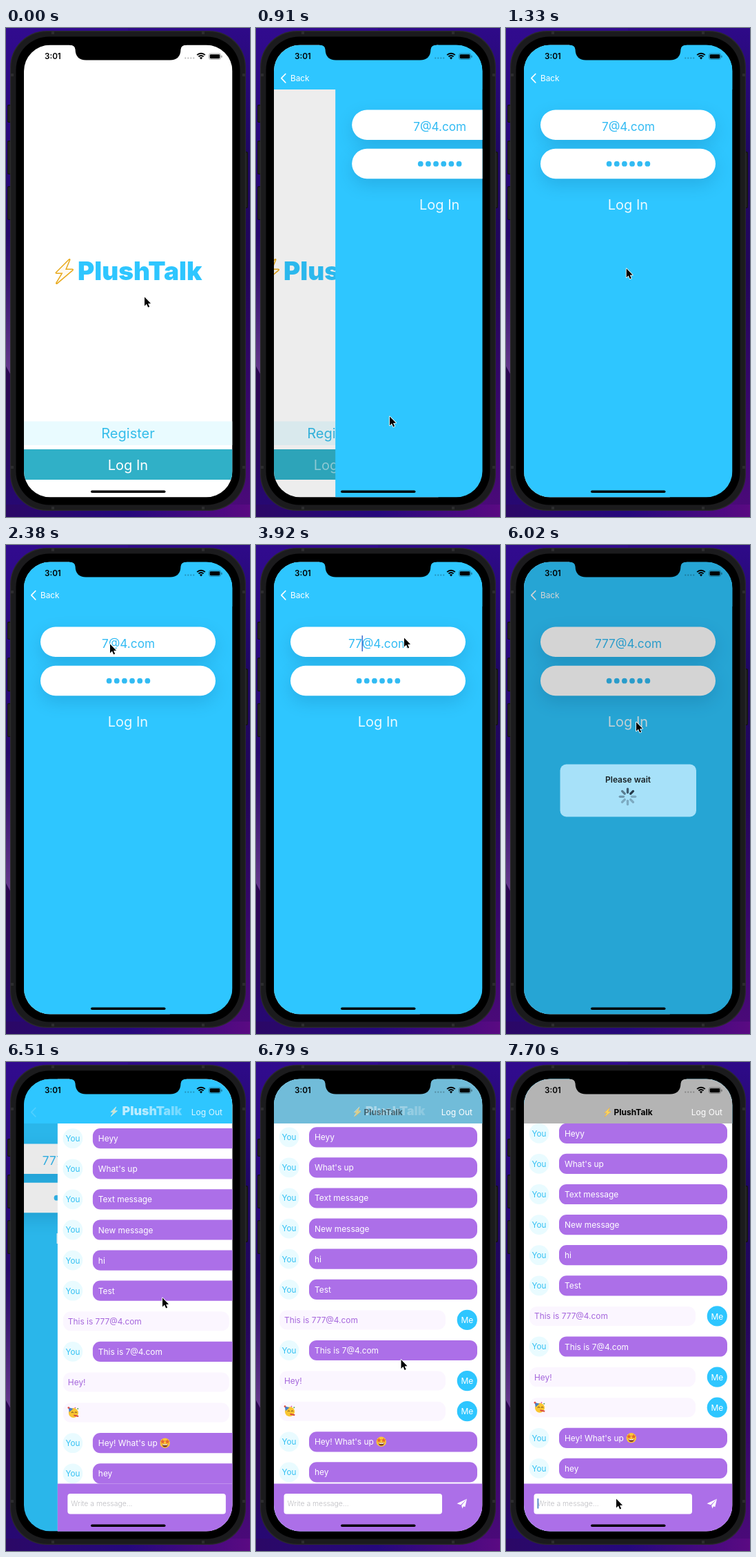
Animation of 354x708 px, one loop 8000 ms. Source, as an HTML page with a canvas:

```html
<!DOCTYPE html>
<html lang="en">
<head>
<meta charset="utf-8">
<title>Chat app demo</title>
<style>
html, body { margin: 0; width: 100%; height: 100%; overflow: hidden; background: #1a0850; }
canvas { display: block; width: 354px; height: 708px; }
</style>
</head>
<body>
<canvas id="stage"></canvas>
<script>
const W = 354, H = 708, LOOP = 8000, STEP = 70;
const BLUE = '#2ec6ff', PURPLE = '#ac6fe8', PALE = '#e9fbff', APP = 'PlushTalk';
const SX = 26, SY = 24.5, SW = 302.5, SH = 655, CORNER = 38;
const PUSH_LOGIN = 734, PUSH_CHAT = 6276, ALERT_IN = 4970, ALERT_OUT = 5990;

const canvas = document.getElementById('stage');
const dpr = window.devicePixelRatio || 1;
canvas.width = W * dpr;
canvas.height = H * dpr;
const c = canvas.getContext('2d');

const clamp = v => Math.max(0, Math.min(1, v));
const ramp = (t, a, b) => clamp((t - a) / (b - a));
const smooth = v => v * v * (3 - 2 * v);

// Critically damped spring used for screen pushes
function push(t, start) {
  const x = (t - start) * 0.014;
  if (x <= 0) return 0;
  return x > 7 ? 1 : 1 - (1 + x) * Math.exp(-x);
}

function rect(x, y, w, h, fill) {
  c.fillStyle = fill;
  c.fillRect(x, y, w, h);
}

function round(x, y, w, h, r, fill) {
  c.beginPath();
  c.roundRect(x, y, w, h, r);
  c.fillStyle = fill;
  c.fill();
}

function disc(x, y, r, fill) {
  c.beginPath();
  c.arc(x, y, r, 0, Math.PI * 2);
  c.fillStyle = fill;
  c.fill();
}

function poly(points, fill, stroke, width) {
  c.beginPath();
  points.forEach(([x, y]) => c.lineTo(x, y));
  c.closePath();
  c.lineJoin = 'round';
  if (stroke) {
    c.strokeStyle = stroke;
    c.lineWidth = width;
    c.stroke();
  }
  if (fill) {
    c.fillStyle = fill;
    c.fill();
  }
}

function gradient(x0, y0, x1, y1, ...colors) {
  const g = c.createLinearGradient(x0, y0, x1, y1);
  colors.forEach((color, i) => g.addColorStop(i / (colors.length - 1), color));
  return g;
}

function text(s, x, y, size, fill, weight = 400, align = 'left') {
  c.font = `${weight} ${size}px Inter, "Open Sans", sans-serif`;
  c.textAlign = align;
  c.fillStyle = fill;
  c.fillText(s, x, y);
}

function layer(draw, { x = 0, y = 0, scale = 1, alpha = 1 } = {}) {
  c.save();
  c.translate(x, y);
  c.scale(scale, scale);
  c.globalAlpha *= alpha;
  draw();
  c.restore();
}

function bolt(x, y, scale, fill, stroke, width) {
  layer(() => poly([[20.5, 1], [1.5, 20], [11, 20], [2, 35], [25, 15.5], [14.5, 15.5]],
    fill, stroke, width), { x, y, scale });
}

function backdrop() {
  rect(0, 0, W, H, gradient(0, 0, 0, H, '#310b8e', '#28087a', '#240866', '#2c0a62', '#260874'));
  rect(W / 2, 0, W / 2, H, gradient(0, 0, 0, H, '#2e0a88', '#1f0764', '#22065a', '#36076a', '#4c0a7a'));
  rect(0, 690, W, 18, gradient(0, 0, W, 0, '#2b0866', '#25087c', '#5a0a82'));
  poly([[0, 300], [12, 300], [12, 512], [0, 490]],
    gradient(0, 300, 0, 502, 'rgba(92,48,140,0)', '#663a8c'));
  poly([[0, 490], [12, 512], [12, 680], [0, 680]],
    gradient(0, 490, 0, 680, '#2a0650', 'rgba(42,6,80,0)'));
}

function phoneBody() {
  const buttons = [[2, 111, 26], [2, 163, 49], [2, 229, 49], [345, 179, 82]];
  buttons.forEach(([x, y, h]) => {
    round(x, y, 6, h, 2, '#111');
    round(x + 0.8, y + 1, 4, h - 2, 1.5, '#222');
  });
  round(6, 4, 342, 695, 53, '#2a2a2c');
  round(7.2, 5.2, 339.6, 692.6, 52, '#1b1b1d');
  for (const y of [66, 634]) {
    rect(7, y, 4, 4, '#2d2d2f');
    rect(343, y, 4, 4, '#2d2d2f');
  }
  for (const y of [5, 693]) {
    rect(66, y, 4, 4, '#2d2d2f');
    rect(284, y, 4, 4, '#2d2d2f');
  }
  round(14.5, 12.5, 325, 678, 48, '#000');
}

function notch() {
  c.beginPath();
  c.moveTo(92, 23);
  c.lineTo(92, 24.5);
  c.quadraticCurveTo(100, 24.5, 100.5, 31);
  c.quadraticCurveTo(101, 46.5, 116, 46.5);
  c.lineTo(238, 46.5);
  c.quadraticCurveTo(253, 46.5, 253.5, 31);
  c.quadraticCurveTo(254, 24.5, 262, 24.5);
  c.lineTo(262, 23);
  c.fillStyle = '#000';
  c.fill();
}

function statusBar() {
  text('3:01', 56, 45.2, 11.7, '#000', 600);
  for (let i = 0; i < 4; i++) disc(260.3 + i * 4, 43.6, 1.1, 'rgba(0,0,0,.28)');
  c.strokeStyle = '#000';
  c.lineWidth = 1.9;
  for (const r of [8.2, 5]) {
    c.beginPath();
    c.arc(283, 45, r, -Math.PI * 0.75, -Math.PI * 0.25);
    c.stroke();
  }
  poly([[283, 45.4], [280.9, 43], [283, 42], [285.1, 43]], '#000');
  c.beginPath();
  c.roundRect(294.5, 37, 17, 8.4, 2.4);
  c.strokeStyle = 'rgba(0,0,0,.4)';
  c.lineWidth = 0.8;
  c.stroke();
  round(295.7, 38.2, 14.6, 6, 1.4, '#000');
  round(312.4, 39.8, 1.2, 3, 0.6, 'rgba(0,0,0,.45)');
}

function home(pressed) {
  rect(SX, SY, SW, SH, '#fff');
  bolt(71.5, 334.5, 1, '#fffaf0', '#e8a91c', 3);
  text(APP, 104, 365, 37, BLUE, 900);
  rect(SX, 569.5, SW, 34.5, PALE);
  text('Register', 177, 594, 20, '#36bdea', 400, 'center');
  rect(SX, 610, SW, 44, '#30b0c7');
  text('Log In', 177, 640, 20, pressed ? 'rgba(255,255,255,.5)' : '#fff', 400, 'center');
}

function field(y, h) {
  c.save();
  c.shadowColor = 'rgba(0,60,110,.18)';
  c.shadowBlur = 26 * dpr;
  c.shadowOffsetY = 9 * dpr;
  round(50, y, 254, h, 22, '#fff');
  c.restore();
}

function caretShown(t) {
  const spans = [[2450, 3010], [3500, 3710], [3780, 4550], [4760, 4970]];
  return spans.some(([a, b]) => t >= a && t < b);
}

function login(t) {
  rect(SX, SY, SW, SH, BLUE);
  field(118.5, 43.5);
  field(174.8, 43.4);
  const digits = t < 3920 ? 1 : t < 4130 ? 2 : 3;
  const mail = '7'.repeat(digits) + '@4.com';
  text(mail, 177.5, 149, 17.2, '#32bbf3', 400, 'center');
  if (caretShown(t)) {
    const left = 177.5 - c.measureText(mail).width / 2;
    const x = left + c.measureText('7'.repeat(digits)).width;
    rect(x - 0.3, 131, 1.5, 23, '#3d6ecf');
  }
  for (let i = 0; i < 6; i++) disc(149.6 + i * 11.15, 196.7, 3.9, '#32bbf3');
  const pressed = t >= 4830 && t < ALERT_IN;
  text('Log In', 177, 263, 20, `rgba(255,255,255,${pressed ? 0.35 : 0.9})`, 400, 'center');
}

function partyFace(x, y) {
  disc(x, y + 0.5, 7, '#f9c531');
  poly([[x - 7.5, y - 7.5], [x - 0.5, y - 5.5], [x - 6, y - 0.5]], '#4b7fc4');
  disc(x - 7, y - 7, 1.4, '#e2504a');
  c.strokeStyle = '#69431c';
  c.lineWidth = 1;
  for (const dx of [-1.5, 3.5]) {
    c.beginPath();
    c.arc(x + dx, y + 0.5, 1.3, Math.PI, 0);
    c.stroke();
  }
  poly([[x + 0.5, y + 3], [x + 7.5, y + 4.5], [x + 7, y + 6.5], [x + 0.5, y + 5]], '#d9483f');
  disc(x + 6.3, y - 5.5, 1, '#58a957');
  disc(x + 2.5, y - 7, 0.9, '#d952a0');
}

function star(x, y, r) {
  const pts = Array.from({ length: 10 }, (_, i) => {
    const a = -Math.PI / 2 + i * Math.PI / 5, k = i % 2 ? r * 0.45 : r;
    return [x + k * Math.cos(a), y + k * Math.sin(a)];
  });
  poly(pts, '#e5682d');
}

function starFace(x, y) {
  disc(x, y, 7.2, '#fbc638');
  star(x - 3.4, y - 2, 3.8);
  star(x + 3.4, y - 2, 3.8);
  c.beginPath();
  c.arc(x, y + 1.8, 4, 0, Math.PI);
  c.fillStyle = '#7b3522';
  c.fill();
  rect(x - 3.3, y + 1.8, 6.6, 1.3, '#fff');
}

const messages = [
  ['Heyy'], ["What's up"], ['Text message'], ['New message'], ['hi'], ['Test'],
  ['This is 777@4.com', 1], ['This is 7@4.com'], ['Hey!', 1], ['', 1, partyFace],
  ["Hey! What's up", 0, starFace], ['hey']
];

function message([body, mine, emoji], y) {
  const x = mine ? 41 : 85;
  if (mine) {
    round(34, y - 14, 241, 28, 11, '#fbf6ff');
    disc(306.3, y, 14.6, BLUE);
    text('Me', 306.3, y + 4.6, 12, '#fff', 400, 'center');
  } else {
    disc(48, y, 14.4, PALE);
    text('You', 48, y + 4.4, 11.7, '#35c1f3', 400, 'center');
    round(77, y - 14.6, 244, 29.2, 11, PURPLE);
  }
  text(body, x, y + 4.5, 11.9, mine ? '#a566dc' : '#fff');
  if (emoji) emoji(body ? x + c.measureText(body).width + 11 : x + 8, y);
}

function chat(t, scroll) {
  rect(SX, SY, SW, SH, '#fff');
  messages.forEach((m, i) => message(m, 110.7 - scroll + i * 44.1));
  rect(SX, 610.5, SW, 70, PURPLE);
  round(40.5, 625, 229.5, 29.5, 4, '#fff');
  text('Write a message...', 45.5, 643.3, 10.4, '#bdbdc2', 300);
  if (t >= 7560) rect(45.6, 632, 1.6, 14.5, '#3f79c4');
  poly([[306, 632.5], [291.5, 639.3], [297, 641.2]], '#fff');
  poly([[306, 632.5], [298.2, 642], [299.3, 646.5], [301, 643.3], [303.3, 644.3]], '#fff');
}

function navBar(t, p, settled) {
  rect(SX, SY, SW, 64.5, BLUE);
  if (settled) layer(() => rect(SX, SY, SW, 64.5, '#b4b4b4'), { alpha: settled });
  const shown = ramp(t, PUSH_LOGIN, PUSH_LOGIN + 140);
  layer(() => {
    c.beginPath();
    c.moveTo(42.8, 66.5);
    c.lineTo(36.8, 72.7);
    c.lineTo(42.8, 79);
    c.strokeStyle = '#fff';
    c.lineWidth = 1.7;
    c.lineCap = 'round';
    c.stroke();
  }, { alpha: shown * (1 - p) });
  layer(() => text('Back', 50, 77.2, 11.8, '#fff'), { alpha: shown * clamp(1 - p * 1.4) });
  if (p <= 0) return;
  layer(() => text('Log Out', 314, 77.2, 12.1, '#fff', 400, 'right'), { alpha: p });
  layer(() => {
    const fade = gradient(195, 0, 263, 0, 'rgba(255,255,255,.82)', 'rgba(255,255,255,.3)');
    bolt(151.5, 64.5, 0.4, '#e9e6c5', 'rgba(255,255,255,.8)', 2);
    text(APP, 168.5, 77.2, 17.8, fade, 900);
  }, { x: (1 - p) * 60 - 9.7, alpha: p * (1 - settled) });
  layer(() => {
    bolt(142.5, 66, 0.38, '#ffd45c', '#f0a92c', 2);
    text(APP, 156.5, 77, 12, '#000', 700);
  }, { alpha: settled });
}

function spinner(t) {
  const head = Math.floor((t - 5300) / 100);
  c.lineCap = 'round';
  c.lineWidth = 3.3;
  for (let i = 0; i < 8; i++) {
    const a = (head - i) * Math.PI / 4;
    c.strokeStyle = `rgba(16,28,44,${[1, 0.78, 0.6, 0.43][i] || 0.32})`;
    c.beginPath();
    c.moveTo(176.5 + 6 * Math.cos(a), 364.3 + 6 * Math.sin(a));
    c.lineTo(176.5 + 11.2 * Math.cos(a), 364.3 + 11.2 * Math.sin(a));
    c.stroke();
  }
}

function alertBox(t) {
  const enter = smooth(ramp(t, ALERT_IN - 40, ALERT_IN + 220));
  const alpha = enter * (1 - ramp(t, ALERT_OUT, ALERT_OUT + 210));
  if (alpha <= 0) return;
  rect(SX, SY, SW, SH, `rgba(0,0,0,${0.195 * alpha})`);
  const scale = 1.15 - 0.15 * enter;
  layer(() => {
    round(78.5, 317.5, 197.5, 76, 9, '#bdecff');
    text('Please wait', 177, 343.8, 12, '#000', 600, 'center');
    spinner(t);
  }, { x: 177 * (1 - scale), y: 355 * (1 - scale), scale, alpha });
}

// Pointer stops: time, x, y
const stops = [
  [0, 201, 389], [420, 184, 630], [700, 184, 630], [910, 194, 562], [1680, 160, 185],
  [2240, 151, 143], [2450, 151, 143], [2870, 205, 136], [3220, 215, 134], [4200, 215, 134],
  [4760, 189, 256], [6090, 189, 256], [6510, 227, 341], [7070, 194, 520], [7420, 160, 632]
];

function pointer(t) {
  let i = stops.findIndex(s => s[0] > t);
  if (i < 0) i = stops.length;
  const a = stops[i - 1], b = stops[i] || a;
  const k = a === b ? 0 : smooth(ramp(t, a[0], b[0]));
  const shape = [[0, 0], [0, 14], [3.2, 11], [5.6, 16.2], [7.8, 15.2], [5.5, 10.2], [9.8, 10]];
  layer(() => poly(shape, '#000', '#fff', 1.8),
    { x: a[1] + (b[1] - a[1]) * k, y: a[2] + (b[2] - a[2]) * k + 0.5, scale: 0.92 });
}

function pushed(under, over, p) {
  layer(under, { x: -0.3 * SW * p });
  if (p > 0) {
    rect(SX, SY, SW, SH, `rgba(0,0,0,${0.1 * p})`);
    layer(over, { x: SW * (1 - p) });
  }
}

function render(t) {
  c.setTransform(dpr, 0, 0, dpr, 0, 0);
  backdrop();
  phoneBody();
  c.save();
  c.beginPath();
  c.roundRect(SX, SY, SW, SH, CORNER);
  c.clip();
  const p1 = push(t, PUSH_LOGIN), p2 = push(t, PUSH_CHAT);
  const settled = smooth(ramp(t, 6650, 6930));
  if (p2 > 0) {
    const scroll = 7.4 * smooth(ramp(t, 6650, 7070));
    pushed(() => login(t), () => chat(t, scroll), p2);
  } else {
    pushed(() => home(t >= 560 && t < 1000), () => login(t), p1);
  }
  if (p1 > 0) navBar(t, p2, settled);
  alertBox(t);
  statusBar();
  round(123, 669.5, 108.5, 3.6, 1.8, '#000');
  c.restore();
  notch();
  pointer(t);
}

function frame(now) {
  render(Math.floor((now % LOOP) / STEP) * STEP);
  requestAnimationFrame(frame);
}
requestAnimationFrame(frame);
</script>
</body>
</html>
```
